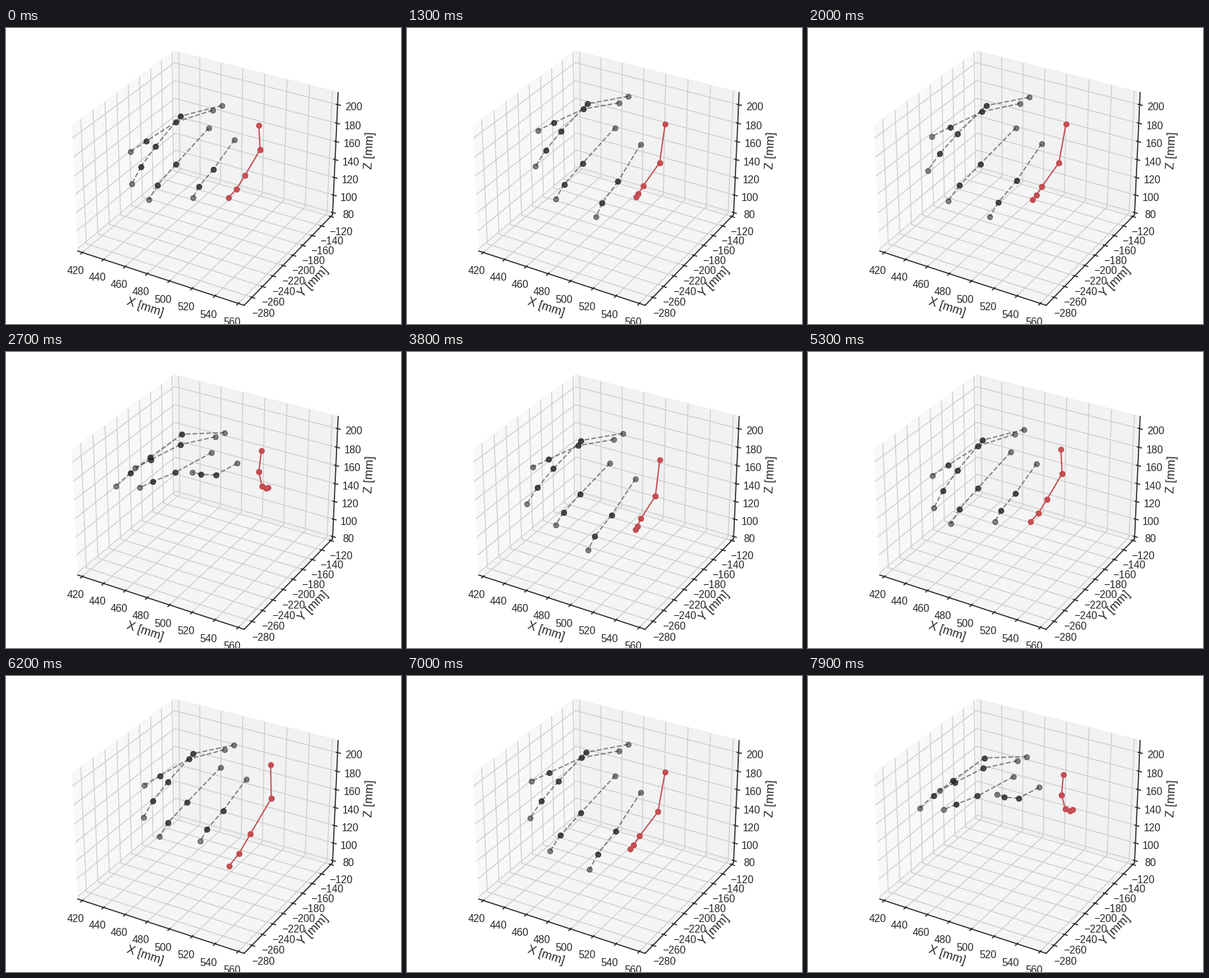
Animation of 600x450 px, one loop 8 s. Source, as a matplotlib script:

```python
import numpy as np
import matplotlib.pyplot as plt
from matplotlib.animation import FuncAnimation

FRAMES, INTERVAL, PERIOD = 80, 100, 53
INK, RED = "0.15", "#C44E52"

plt.rcParams.update({
    "font.family": "Liberation Sans",
    "text.color": INK, "axes.labelcolor": INK, "axes.edgecolor": INK,
    "xtick.color": INK, "ytick.color": INK,
    "axes.linewidth": 1.25, "xtick.major.width": 1.25, "ytick.major.width": 1.25,
    "axes.labelsize": 14, "xtick.labelsize": 12, "ytick.labelsize": 12,
    "grid.color": "0.8", "grid.linewidth": 1,
    "lines.linewidth": 1.5, "lines.markersize": 6,
})

# Hand at rest on screen as x + yj, each finger from base to tip
HAND = [np.array(f) for f in (
    [384+148j, 386+185j, 363+224j, 350+245j, 338+258j],   # thumb
    [347+170j, 315+215j, 293+241j, 284+258j],             # index
    [308+152j, 258+207j, 230+239j, 217+261j],             # middle
    [328+118j, 265+134j, 227+180j, 205+211j, 191+237j],   # ring
    [314+125j, 258+143j, 213+172j, 189+188j],             # little
)]
PALM_Y = 143


def bend(finger, base, stretch, taper, turn, curl):
    """Scale and rotate the bones; taper and curl build up towards the tip."""
    j = np.arange(len(finger) - 1)
    spin = np.exp(1j * np.radians(turn + curl * j))
    bones = np.diff(finger) * stretch * taper ** j * spin
    return base + np.append(0, np.cumsum(bones))


def pose(move=0, tilt=0, thumb=(1, 1, 0, 0), stretch=(1, 1, 1, 1),
         turn=(0, 0), curl=0):
    """Turn runs from index to little finger; curl fades after the index."""
    shapes = [thumb] + [(stretch[i], 1, turn[0] + (turn[1] - turn[0]) * i / 3,
                         curl * 0.3 ** i) for i in range(4)]
    bases = [f[0] + move + 1j * tilt * (f[0].imag - PALM_Y) for f in HAND]
    return [bend(f, b, *s) for f, b, s in zip(HAND, bases, shapes)]


REST = pose()
SPREAD = pose(18-13j, 0, (1.38, 1, 2, -2), (1.08, 0.99, 0.97, 0.95), (1, 3))
REACH = pose(8-4j, 0.4, (1.6, 0.6, 11, -6), (1.2, 0.99, 0.97, 0.93), (-4, 8))
CLOSED = pose(4+2j, -0.1, (0.87, 0.57, 10, -52), (0.67, 0.85, 1, 0.93),
              (26, 5), 26)
REOPEN = pose(14j, 0.33, (1.5, 0.6, 10, -8), (1.2, 0.88, 1, 0.93), (-2, 8))

# (step, pose, extra shift of the fingertips)
TIMELINE = [
    (0, REST, 0), (9, SPREAD, 0), (13, REACH, 0), (19, REACH, -12+8j),
    (25, CLOSED, 6-4j), (27, CLOSED, 0), (33, REOPEN, 13j), (38, REOPEN, 0),
    (45, REOPEN, 28j), (49, REOPEN, -14+8j), (PERIOD, REST, 0),
]
TIMES = np.array([key[0] for key in TIMELINE], float)


def key_points(n):
    """Joints of finger n at every key, as x and y."""
    grow = np.linspace(0, 1, len(HAND[n]))
    z = np.array([shape[n] + grow * shift for _, shape, shift in TIMELINE])
    return np.stack([z.real, z.imag], axis=-1)


def key_slopes(points):
    """Monotone tangents, so that no joint overshoots its keys."""
    after = np.diff(points, axis=0) / np.diff(TIMES)[:, None, None]
    before = np.roll(after, 1, axis=0)
    same = before * after > 0
    total = np.where(same, before + after, 1)
    slope = np.where(same, 2 * before * after / total, 0)
    return np.concatenate([slope, slope[:1]])


def joints_at(step, points, slopes):
    t = step % PERIOD
    k = np.searchsorted(TIMES, t, side="right") - 1
    h = TIMES[k + 1] - TIMES[k]
    s = (t - TIMES[k]) / h
    return ((1 + 2 * s) * (1 - s) ** 2 * points[k]
            + s * (1 - s) ** 2 * h * slopes[k]
            + s * s * (3 - 2 * s) * points[k + 1]
            + s * s * (s - 1) * h * slopes[k + 1])


fig = plt.figure(figsize=(6.4, 4.8), dpi=93.75, facecolor="white")
box = fig.add_axes([0, 0, 1, 1], projection="3d")
box.set(xlim=(415.7, 565), ylim=(-294.5, -116), zlim=(77.5, 213),
        xlabel="X [mm]", ylabel="Y [mm]", zlabel="Z [mm]")
box.set_xticks(range(420, 561, 20))
box.set_yticks(range(-280, -119, 20))
box.set_zticks(range(80, 201, 20))

stage = fig.add_axes([0, 0, 1, 1])
stage.set(xlim=(0, 600), ylim=(450, 0))
stage.axis("off")


def make_finger(n):
    style = dict(color=INK, ls="--", alpha=0.55) if n else dict(color=RED)
    points = key_points(n)
    bones = [stage.plot([], [], marker="o", **style)[0] for _ in HAND[n][1:]]
    return bones, points, key_slopes(points)


fingers = [make_finger(n) for n in range(len(HAND))]


def update(step):
    for bones, points, slopes in fingers:
        joints = joints_at(step, points, slopes)
        for bone, a, b in zip(bones, joints, joints[1:]):
            bone.set_data([a[0], b[0]], [a[1], b[1]])
    return [bone for bones, _, _ in fingers for bone in bones]


anim = FuncAnimation(fig, update, frames=FRAMES, interval=INTERVAL,
                     repeat=True, repeat_delay=0, blit=False)
plt.show()
```
